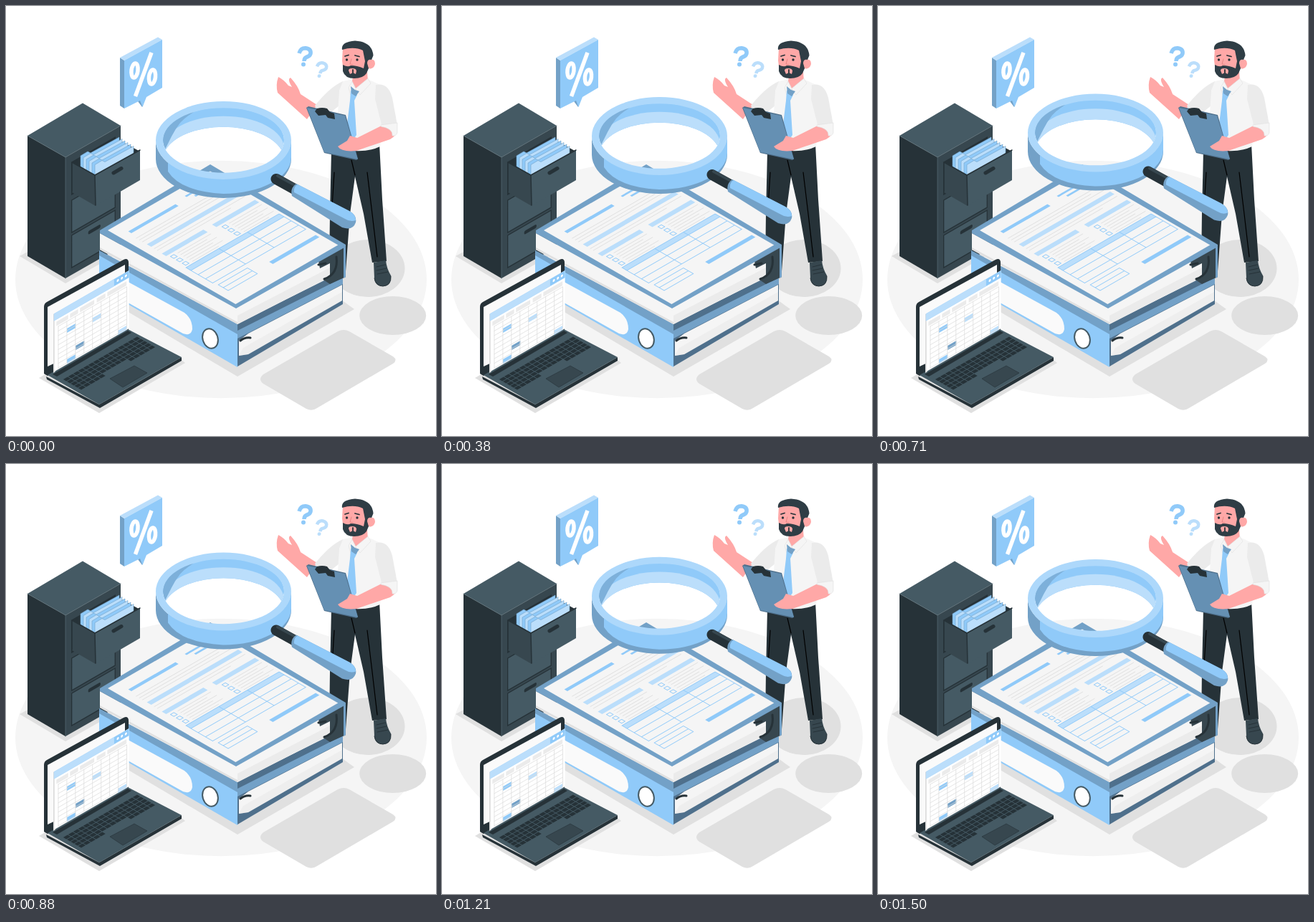
Animation of 600 by 600 pixels, one loop 1.54 s. Source, as an HTML page:

```html
<!DOCTYPE html>
<html lang="en">
<head>
<meta charset="utf-8">
<title>Audit</title>
<style>
html, body { margin: 0; height: 100%; overflow: hidden; background: #fff; }
svg { display: block; width: 100vw; height: 100vh; }
.b { fill: #90caf9 } .d { fill: #73a1c7 } .l { fill: #bbdefb } .n { fill: #4f708c }
.k { fill: #263238 } .m { fill: #37474f } .g { fill: #455a64 }
.w { fill: #f5f5f5 } .s { fill: #e0e0e0 } .p { fill: #ffa8a7 }
.line { fill: none; stroke-linecap: round; stroke-linejoin: round }
</style>
</head>
<body>
<svg viewBox="0 0 600 600">
  <defs>
    <clipPath id="wall"><path d="M222.900 200.500A84.500 45.300 0 1 1 384.100 200.500A84.500 45.300 0 0 0 222.900 200.500Z"/></clipPath>
  </defs>

  <ellipse cx="300" cy="381.500" rx="287" ry="165.700" fill="#f5f5f5"/>
  <g class="s">
    <path d="M19 349L30 343 160 336 166 340 83 387Z"/>
    <ellipse cx="505" cy="366" rx="51.500" ry="40"/>
    <ellipse cx="539.700" cy="432" rx="46.500" ry="27"/>
    <path d="M359 514L463 454Q471 450 479 454L540 489Q547 494 540 499L434 561Q427 566 419 562L359 527Q351 521 359 514Z"/>
    <path d="M120 397L323 517 486 423 468 410Z"/>
    <path d="M46 519L130 568 250 498 240 490 58 512Z"/>
  </g>

  <!-- cabinet -->
  <path class="k" d="M30 181L83 211V380L30 349Z"/>
  <path class="g" d="M30 181L107 135.500 160 167 83 211Z"/>
  <path class="m" d="M83 211L160 167V336L83 380Z"/>
  <path class="line" stroke="#5b6d76" stroke-width=".7" d="M30 181L83 211 160 167M83 211V380"/>
  <g transform="matrix(.866 -.5 0 1 83 211)">
    <g class="g" stroke="#263238" stroke-width="1.500">
      <path class="k" d="M10 12H80V57H10Z"/>
      <path d="M10 65H80V110H10ZM10 114H80V159H10Z"/>
    </g>
    <path class="line" stroke="#263238" stroke-width="5" d="M39 124H54"/>
  </g>
  <path class="k" d="M92 218L152 184 187 203 125 240Z"/>
  <g id="files" stroke="#73a1c7" stroke-width=".6"></g>
  <path class="m" d="M92 218L124 236 125 279 92 260Z"/>
  <path class="g" d="M124 236L187 201V243L125 279Z"/>
  <path class="line" stroke="#263238" stroke-width="1.500" d="M92 259V218L124 236 187 201M124 236L125 278"/>
  <path class="line" stroke="#263238" stroke-width="5" d="M150 233L161 226.500"/>

  <!-- percent bubble -->
  <path class="d" d="M159 72L165 76V143L159 139ZM184 133L190 141 194 128 188 128Z"/>
  <path class="l" d="M159 72L212 43.500 218 47 165 76Z"/>
  <path class="b" d="M165 76L218 47V114L196 127 190.500 141 187 132 165 143Z"/>
  <g class="line" stroke="#fff" stroke-width="5.500">
    <ellipse cx="179.500" cy="90" rx="4.500" ry="10" transform="rotate(7 179.500 90)"/>
    <ellipse cx="204" cy="99" rx="4.500" ry="10" transform="rotate(7 204 99)"/>
    <path stroke-linecap="butt" d="M180.500 126L203 65"/>
  </g>

  <!-- question marks -->
  <g id="mark">
    <path class="line" style="stroke-linecap:butt" stroke="currentColor" stroke-width="5.500" d="M409 66Q411 58.500 418 58.700 426 60 425 66.500 424 70 419 71.500 416 73 416 77"/>
    <circle cx="415" cy="81.500" r="3" fill="currentColor"/>
  </g>

  <!-- man -->
  <path class="k" d="M454 203L521 192 525 270 531 356 511 358 499 290 487 238 480 290 474 370 451 366 452 290Z"/>
  <path class="line" stroke="#000" stroke-width="1.200" d="M487 236L482 215M504 232L511 290 518 350M458 232L455 280"/>
  <path class="m" d="M513 358L530 355Q531 366 537 376 538 391 526 391 515 391 514 380Z"/>
  <path class="line" stroke="#263238" stroke-width="1" d="M514 380Q516 391 526 391 538 390 537 377M517 364L529 361M517 369L531 366M518 374L533 371"/>
  <path class="p" d="M380 99Q376 110 379 121L420 158 434 138 411 123Q408 112 397 100 392 102 399 113L394 111Q388 103 380 99Z"/>
  <path fill="#ebebeb" d="M470 105Q452 113 431 139 437 153 450 151L476 130Z"/>
  <path class="w" d="M470 105L494 100 509 104 522 110 528 150 522 196Q500 207 466 199L463 150 465 118Z"/>
  <path class="p" d="M484 98L504 91 505 106 488 117 482 112Z"/>
  <path class="w" stroke="#e0e0e0" stroke-width=".6" d="M483 105L478 114 481 124 488 116 494 124 509 108 505 101 488 115Z"/>
  <path class="b" d="M481 118L487 117 490 124 486 132 489 180 482 190 474 181 480 132Z"/>
  <path class="d" d="M481 112L487 117 493 119 488 126 482 122Z"/>
  <path class="p" d="M470 58L500 56 507 75Q515 73 515 81 513 89 505 87L501 99 485 101 471 92 469 76Z"/>
  <path fill="#2f3d45" d="M469 61Q467 50 487 48.500 511 50 512.500 69L510 75Q504 74 504 80L506 87 503 94Q498 101 486 101 473 101 470 91V82Q477 86 481 83 490 83 499 87L501 77 498 62Q486 56 469 61Z"/>
  <path class="p" d="M478 90Q478 87 483 87 489 87 489 91L488 95 484 93 480 95Z"/>
  <path class="line" stroke="#263238" stroke-width="1.800" d="M473 70L478 68.500M487 69L493 70.500M484 89V93"/>
  <g class="k"><circle cx="475.500" cy="75" r="1.700"/><circle cx="490" cy="75" r="1.700"/></g>
  <path class="line" stroke="#e58583" d="M482 74L480 81 484 82"/>
  <path class="n" d="M419 142L422 140 474 152 491 213 489 215 444 205Z"/>
  <path fill="#6590b3" d="M420 142L473 153 491 214 444 204Z"/>
  <path class="k" d="M431 147L434 143Q441 141 448 143L452 148 458 150 459 158 449 156 446 152 436 153Z"/>
  <path class="p" d="M522 168L544 165Q549 179 536 186L489 202Q468 204 463 196L476 188 480 181 490 184Z"/>
  <path fill="#ebebeb" d="M516 110Q533 106 539 128L546 166 525 169 515 130Z"/>
  <path class="w" stroke="#e0e0e0" stroke-width=".6" d="M523 166L546 163 546 177Q544 182 539 181 540 171 523 168Z"/>

  <!-- lower binder -->
  <path class="n" d="M323 458L470 380V416L323 503Z"/>
  <path class="w" d="M338 457L469 389V411L338 486 325 488V467Z"/>
  <path class="s" d="M331 477L469 399V411L338 486 325 488Z" opacity=".35"/>
  <path class="b" d="M130 347L323 457V504L130 393Z"/>
  <path class="d" d="M130 341L323 443V458L130 348Z"/>
  <path class="d" d="M323 451L470 378V388L323 464Z"/>
  <path class="n" d="M323 443L470 370V379L323 453Z"/>
  <path fill="#fafafa" d="M165 382L249 428Q260 436 260 451 258 461 247 457L165 411Z"/>
  <ellipse cx="285" cy="464" rx="10.500" ry="14" fill="#fff" stroke="#455a64" stroke-width="2" transform="rotate(-18 285 464)"/>
  <path class="line" stroke="#263238" stroke-width="3" d="M327 467Q333 462 341 463"/>

  <!-- upper binder -->
  <path class="m" d="M430 357L474 335V378L452 388 440 380Z"/>
  <path class="d" d="M471 337L474 335V378L471 380Z"/>
  <path class="w" d="M131 317L321 421 436 356 438 366 452 359V378L323 444 131 340Z"/>
  <path class="s" d="M131 337L323 441V444L131 340Z"/>
  <path fill="#ebebeb" d="M323 432L452 365V378L323 444Z"/>
  <path class="line" stroke="#263238" stroke-width="3" d="M436 361L446 359M461 350Q464 374 444 381"/>
  <path class="d" d="M131 313L285 221 474 333V336L321 422 131 317Z"/>
  <g transform="matrix(.866 -.5 .866 .5 142 313)">
    <path class="w" d="M0 0H165V206H0Z"/>
    <path class="b" d="M15 18H91V23H15ZM110 14H150V17H110ZM118 21H150V24H118ZM86 174H161V180H86Z"/>
    <path class="l" d="M12 51H159V58H12ZM11 76H78V83H11ZM92 76H161V83H92ZM11 115H161V123H11Z"/>
    <g id="form" class="line"></g>
  </g>

  <!-- laptop -->
  <path class="k" d="M53 420Q53 415 57 413L164 354Q170 351 171 357V458L58 516 53 513Z"/>
  <path fill="#fafafa" d="M58 420L166 361V452L58 503Z"/>
  <path class="k" d="M56 517L130 556 245 490V495L131 561 57 521Z"/>
  <path class="g" d="M58 515L170 451 245 490 130 556Z"/>
  <path class="k" d="M65 514L170 453 175 456 71 517Z"/>
  <path class="m" stroke="#263238" stroke-width=".6" d="M145 520L179 502 197 512 163 532Z"/>
  <g transform="matrix(.866 -.5 .866 .5 79 521)" id="keys" class="k"></g>
  <g transform="matrix(.866 -.5 0 1 66 430)">
    <path fill="#dcdcdc" d="M0 0H3V82H0Z"/>
    <path fill="#fff" d="M2 0H122V81H2Z"/>
    <path class="b" d="M1 0H122V10H1Z"/>
    <path class="l" d="M1 0H98V10H1Z"/>
    <path fill="#ebebeb" d="M5 13H24V19H5ZM27 13H40V19H27ZM43 13H66V19H43ZM70 13H84V19H70ZM87 13H118V19H87Z"/>
    <g fill="#fff"><circle cx="104" cy="5" r="1.800"/><circle cx="110.500" cy="5" r="1.800"/><circle cx="117" cy="5" r="1.800"/></g>
    <path class="b" d="M22 31H36V37H22ZM22 74H36V80H22Z"/>
    <path class="l" d="M63 37H77V43H63ZM104 75H118V81H104Z"/>
    <path class="d" d="M36 62H50V68H36Z"/>
    <g id="sheet" class="line"></g>
  </g>

  <!-- magnifier -->
  <g id="lens">
    <path class="d" d="M209 187.500A94.500 54.500 0 0 0 398 187.500V213.500A94.500 54.500 0 0 1 209 213.500Z"/>
    <path class="b" d="M226 218A94.500 54.500 0 0 0 398 187.500V211A94.500 51 0 0 1 303 262Q244 259 226 231Z"/>
    <g clip-path="url(#wall)">
      <path class="b" d="M209 130H398V220H209Z"/>
      <ellipse class="l" cx="303.500" cy="199" rx="84.500" ry="45.300"/>
      <path fill="#7db0da" d="M209 130H300Q258 146 243 163 236 172 231 182L222 200H209Z"/>
    </g>
    <path fill="#add8fb" fill-rule="evenodd" d="M209 187.500A94.500 54.500 0 0 1 398 187.500A94.500 54.500 0 0 1 209 187.500ZM219 187.500A84.500 45.300 0 0 0 388 187.500A84.500 45.300 0 0 0 219 187.500Z"/>
    <path class="line" stroke="#263238" stroke-width="15" d="M377 241.500L405 257"/>
    <path class="line" stroke="#37474f" stroke-width="4" d="M379 237L405 251"/>
    <path class="d" d="M405 248L479 286Q490 292 488 302 484 314 469 309L399 265Q396 254 405 248Z"/>
    <path class="b" d="M407 249L479 286Q488 291 488 299 481 302 473 297L402 260Q401 252 407 249Z"/>
  </g>
</svg>
<script>
const $ = id => document.getElementById(id);
const path = (d, stroke, width) => `<path d="${d}" stroke="${stroke}" stroke-width="${width}"/>`;
const span = (n, f) => Array.from({ length: n }, (_, i) => f(i)).join('');
const box = (x, y, w, h) => `M${x} ${y}h${w}v${h}h${-w}z`;

// Question marks share one shape
const mark = $('mark');
mark.style.color = '#90caf9';
const small = mark.cloneNode(true);
small.removeAttribute('id');
small.style.color = '#bbdefb';
small.setAttribute('transform', 'translate(440 88.5) rotate(8) scale(.82) translate(-417 -70)');
mark.after(small);

// Folders stand one behind another
$('files').innerHTML = span(6, i =>
  `<path class="${i % 2 ? 'l' : 'b'}" d="M${104 + i * 4} ${209 + i * 2.5}l10 -6 4 2 40 -22v26l-54 30z"/>`);

// Form: text rules, check boxes, tables
const rules = [[12, 34, 140], [12, 39, 128], [12, 44, 146], [12, 63, 146], [12, 68, 118]];
const checks = span(3, i => box(14, 87 + i * 9.5, 5.5, 5.5) + box(97, 87 + i * 9.5, 5.5, 5.5));
const notes = span(6, i => `M25 ${88 + i * 4.7}h${i % 2 ? 42 : 53}M108 ${88 + i * 4.7}h${i % 2 ? 40 : 52}`);
$('form').innerHTML =
  path(rules.map(([x, y, w]) => `M${x} ${y}h${w}`).join('') + notes, '#dedede', .8) +
  path(checks, '#90caf9', 1) +
  path(box(11, 115, 150, 43) + span(3, i => `M11 ${123 + i * 11.7}h150`) + 'M64 115v43M110 115v43' +
    box(13, 165, 47, 16) + 'M13 173h47', '#90caf9', 1);

$('sheet').innerHTML = path(
  span(9, i => `M${8 + i * 13.8} 21v58`) + span(10, i => `M8 ${21 + i * 6.45}h110`), '#dcdcdc', .7);

$('keys').innerHTML = span(5, r => span(15, c =>
  r === 4 && c > 4 && c < 10 ? '' : `<path d="${box(.5 + c * 8, .5 + r * 6, 7, 5)}"/>`));

// The magnifier floats up and back once per loop
const PERIOD = 1540, PEAK = 730, RISE = 10.5;
function draw() {
  const phase = (performance.now() % PERIOD - PEAK) / PERIOD * 2 * Math.PI;
  $('lens').setAttribute('transform', `translate(0 ${-RISE * (1 + Math.cos(phase)) / 2})`);
  requestAnimationFrame(draw);
}
draw();
</script>
</body>
</html>
```
